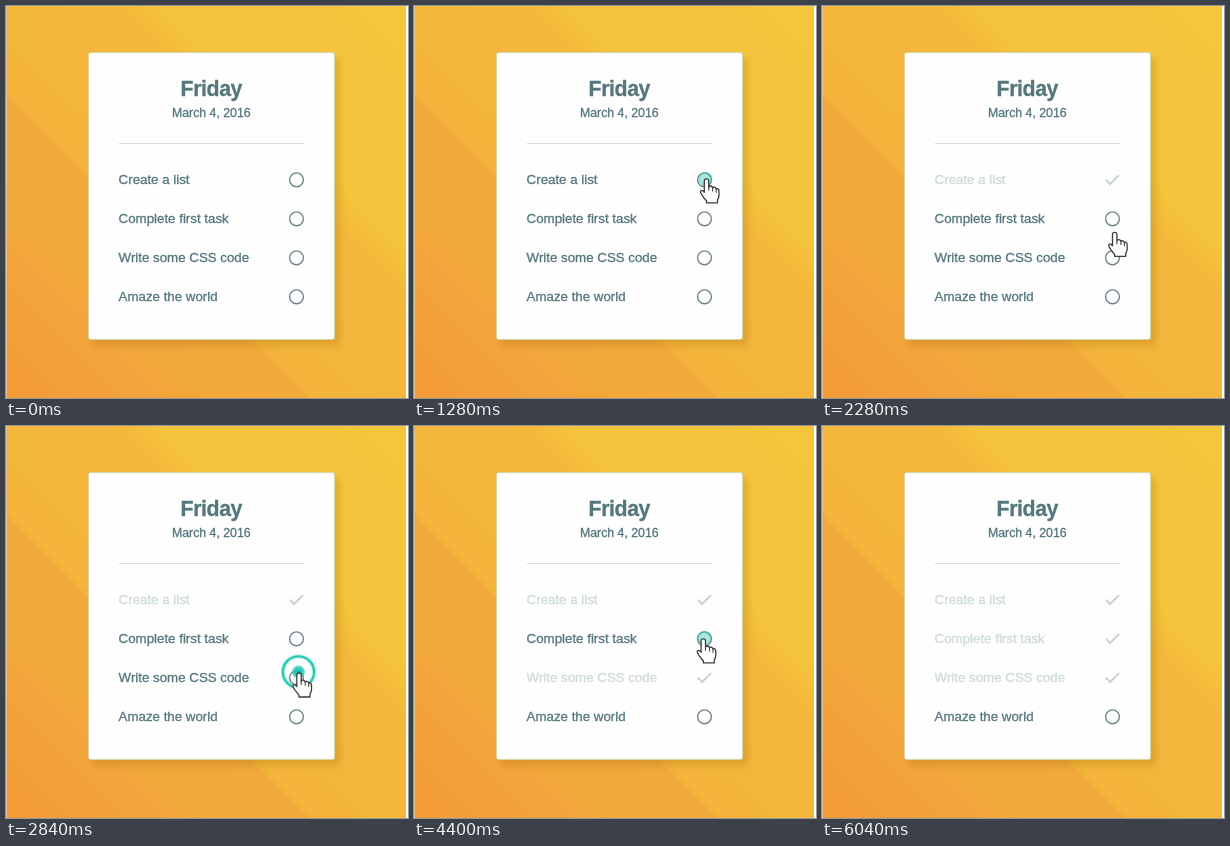
Write an HTML page with a canvas that moves like this. It is 402 px wide and 392 px high and loops after 6.24 s.

```html
<!DOCTYPE html>
<html lang="en">
<head>
<meta charset="utf-8">
<title>To-do list</title>
<style>
  html, body { margin: 0; width: 100%; height: 100%; overflow: hidden; }
  canvas { display: block; }
</style>
</head>
<body>
<canvas id="stage" width="402" height="392"></canvas>
<script>
const ctx = document.getElementById('stage').getContext('2d');
const W = 402, H = 392, LOOP = 6240, STEP = 40;
const FONT = '"Liberation Sans", Arial, sans-serif';
const DARK = [84, 118, 125], PALE = [205, 217, 218];

const items = [
  { label: 'Create a list', y: 174, press: 1250, tap: [291.5, 173] },
  { label: 'Complete first task', y: 213, press: 4370, tap: [290, 212] },
  { label: 'Write some CSS code', y: 252, press: 2740, tap: [292.5, 246] },
  { label: 'Amaze the world', y: 291, press: Infinity }
];

// Pointer path: time, x, y of the fingertip
const path = [
  [240, 383, 190], [720, 297, 181], [1080, 292.5, 172.3], [1400, 292.5, 172.3],
  [1720, 292, 179.3], [1800, 292, 179.3], [2560, 293, 246.5], [2840, 293, 246.5],
  [3000, 294.5, 246.5], [3480, 294.5, 246.5], [4160, 289.3, 212.3], [4760, 289.3, 212.3],
  [4920, 300, 190], [5120, 312, -27]
];

const hand = new Path2D('M-2.2 2.5Q-2.2.5 0 .5Q2.2.5 2.2 2.5V9' +
  'Q2.5 7.5 4.3 7.7Q6 8 6.2 9.7Q6.6 8.6 8 8.9Q9.6 9.3 9.7 11Q10.2 10 11.4 10.6' +
  'Q12.5 11.2 12.5 13V17Q12.5 19.5 11 21.5V24.5H0V22.5Q-2 20.5-4 17.5' +
  'L-5.8 14.6Q-6.6 13-5.2 12.2Q-4 11.7-2.2 14Z');

const progress = (t, a, b) => Math.min(1, Math.max(0, (t - a) / (b - a)));
const ease = p => p * p * (3 - 2 * p);
const mix = (a, b, p) => a + (b - a) * p;
const blend = p => `rgb(${DARK.map((c, i) => Math.round(mix(c, PALE[i], p)))})`;

// A hairline stroke gives the text its slightly heavier weight
function text(str, x, y, font, color, align = 'left') {
  ctx.font = `${font} ${FONT}`;
  ctx.fillStyle = ctx.strokeStyle = color;
  ctx.textAlign = align;
  ctx.lineWidth = 0.3;
  ctx.fillText(str, x, y);
  ctx.strokeText(str, x, y);
}

function circle(x, y, r) {
  ctx.beginPath();
  ctx.arc(x, y, r, 0, Math.PI * 2);
}

function drawBackground() {
  const g = ctx.createLinearGradient(0, 392, 397, -5);
  [[0, '#f39a38'], [0.1, '#f39f3a'], [0.22, '#f2a73b'], [0.38, '#f2a93b'],
   [0.385, '#f4b43b'], [0.63, '#f4b83b'], [0.69, '#f4c43c'], [1, '#f4c63c']]
    .forEach(([p, c]) => g.addColorStop(p, c));
  ctx.fillStyle = g;
  ctx.fillRect(0, 0, W, H);
  ctx.fillStyle = '#d8c496';
  ctx.fillRect(0, 0, 1, H);
  ctx.fillStyle = '#fff';
  ctx.fillRect(W - 2, 0, 2, H);
}

function drawCard() {
  ctx.save();
  ctx.shadowColor = 'rgba(150, 95, 0, 0.24)';
  ctx.shadowBlur = 7;
  ctx.shadowOffsetX = 5;
  ctx.shadowOffsetY = 6;
  ctx.fillStyle = '#d8d4a8';
  ctx.beginPath();
  ctx.roundRect(82, 46, 247, 288, 3);
  ctx.fill();
  ctx.restore();
  ctx.fillStyle = '#fefefe';
  ctx.beginPath();
  ctx.roundRect(83, 47, 245, 286, 2);
  ctx.fill();
  ctx.letterSpacing = '-0.4px';
  text('Friday', 205.3, 90, 'bold 21.3px', blend(0), 'center');
  ctx.letterSpacing = '0px';
  text('March 4, 2016', 205.3, 111.2, '12.3px', blend(0), 'center');
  ctx.fillStyle = '#d9dddd';
  ctx.fillRect(113, 137, 185, 1);
}

function drawTick(x, y, p) {
  if (p <= 0) return;
  const len = 18.8;
  ctx.strokeStyle = '#c4d0d1';
  ctx.lineWidth = 1.8;
  ctx.setLineDash([len * p, len]);
  ctx.beginPath();
  ctx.moveTo(x - 6.5, y);
  ctx.lineTo(x - 2.5, y + 4.5);
  ctx.lineTo(x + 6.5, y - 4.5);
  ctx.stroke();
  ctx.setLineDash([]);
}

function drawItem({ label, y, press }, t) {
  const age = t - press, x = 290.5;
  text(label, 112.6, y + 4, '13.3px', blend(progress(age, 140, 400)));
  ctx.globalAlpha = 1 - progress(age, 140, 490);
  ctx.strokeStyle = '#6f868b';
  ctx.lineWidth = 1.4;
  circle(x, y - 0.2, 6.9);
  ctx.stroke();
  ctx.globalAlpha = 1;
  drawTick(x, y - 0.3, progress(age, 490, 750));
}

function drawRipple({ press, tap }, t) {
  const age = t - press;
  if (!(age >= 0 && age < 250)) return;
  const [x, y] = tap;
  const fade = 1 - progress(age, 110, 250);
  const grow = progress(age, 0, 100);
  ctx.save();
  ctx.globalAlpha = fade * mix(0.1, 0.95, grow);
  const glow = ctx.createRadialGradient(x, y, 1, x, y, 7.5);
  glow.addColorStop(0, 'rgb(16, 190, 168)');
  glow.addColorStop(0.6, 'rgba(30, 198, 178, 0.9)');
  glow.addColorStop(1, 'rgba(60, 205, 190, 0)');
  ctx.fillStyle = glow;
  circle(x, y, 7.5);
  ctx.fill();
  ctx.strokeStyle = '#22c8b0';
  ctx.shadowColor = 'rgba(34, 200, 176, 0.6)';
  ctx.shadowBlur = 3;
  ctx.lineWidth = mix(1, 2.4, grow);
  circle(x, y, mix(2, 15.6, grow) + 3 * progress(age, 100, 250));
  ctx.stroke();
  ctx.restore();
}

function drawPointer(t) {
  const i = path.findIndex(k => k[0] > t);
  if (i < 1) return;
  const [t0, x0, y0] = path[i - 1], [t1, x1, y1] = path[i];
  const p = ease(progress(t, t0, t1));
  ctx.save();
  ctx.translate(mix(x0, x1, p), mix(y0, y1, p));
  ctx.fillStyle = '#fff';
  ctx.strokeStyle = '#3c3c3c';
  ctx.lineWidth = 1.3;
  ctx.lineJoin = 'round';
  ctx.fill(hand);
  ctx.stroke(hand);
  ctx.lineWidth = 1;
  ctx.beginPath();
  for (const [x, y] of [[2.2, 9], [6.2, 9.7], [9.7, 11]]) {
    ctx.moveTo(x, y);
    ctx.lineTo(x, y + 3.5);
  }
  ctx.stroke();
  ctx.restore();
}

function draw(now) {
  const t = Math.floor((now % LOOP) / STEP) * STEP;
  drawBackground();
  drawCard();
  items.forEach(item => drawItem(item, t));
  items.forEach(item => drawRipple(item, t));
  drawPointer(t);
}

const start = performance.now();
function tick() {
  draw(Math.max(0, performance.now() - start));
  requestAnimationFrame(tick);
}
tick();
</script>
</body>
</html>
```
